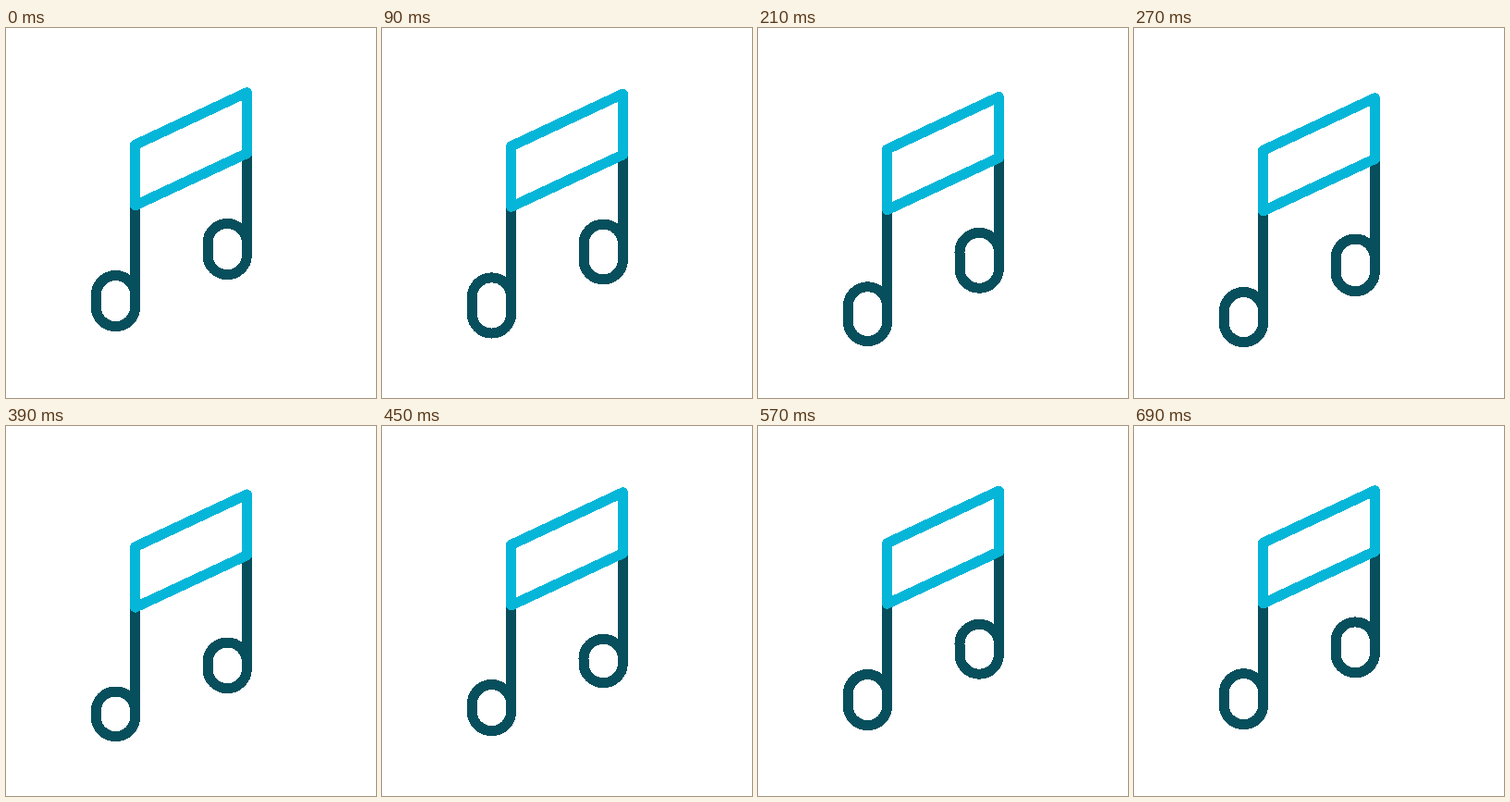
Recreate the animation shown at these times as an HTML page. Size 400x400 px, loop 0.72 s.

```html
<!DOCTYPE html>
<html lang="en">
<head>
<meta charset="utf-8">
<title>Bouncing notes</title>
<style>
  html, body { margin: 0; width: 100%; height: 100%; overflow: hidden; background: #fff; }
  svg { display: block; width: 100%; height: 100%; }
  path { fill: none; stroke-width: 11; stroke-linejoin: round; shape-rendering: crispEdges; }
  .note { stroke: #074f5c; }
  .beam { stroke: #05b6d8; }
</style>
</head>
<body>
<svg viewBox="0 0 400 400">
  <path class="note" id="left"/>
  <path class="note" id="right"/>
  <path class="beam" id="beam" d="M139.7 126.3 L260.4 69.7 V135.5 L139.7 191.8 Z"/>
</svg>
<script>
const LOOP = 720, STEP = 30, RADIUS = 21.2;
const times = [0, 150, 270, 390, 450, 570, 690];

// Downward shift of each part, in pixels, at the times above.
const shift = {
  beam:        [0, 3, 6, 4.3, 2.1, 0.4, 0],
  leftTop:     [0, 6, 18, 19.5, 12, 1, 0.2],
  leftBottom:  [0, 13, 17, 13, 7, 1, 0],
  rightTop:    [0, 3.5, 16.5, 22.5, 18.8, 2.8, 0.4],
  rightBottom: [0, 10, 18, 17, 11, 1.5, 0.1]
};

// Smooth periodic curve through the key values.
function curve(values) {
  const n = times.length;
  const wrap = i => (i + n) % n;
  const span = i => (times[wrap(i + 1)] - times[wrap(i)] + LOOP) % LOOP;
  const slope = i => (values[wrap(i + 1)] - values[wrap(i)]) / span(i);
  const tangent = i =>
    (slope(i - 1) * span(i) + slope(i) * span(i - 1)) / (span(i - 1) + span(i));

  return t => {
    let i = n - 1;
    while (times[i] > t) i--;
    const h = span(i), u = (t - times[i]) / h, v = 1 - u;
    return values[i] * (1 + 2 * u) * v * v + values[wrap(i + 1)] * u * u * (3 - 2 * u)
      + h * u * v * (tangent(i) * v - tangent(i + 1) * u);
  };
}

const at = {};
for (const key in shift) at[key] = curve(shift[key]);

const el = id => document.getElementById(id);
const left = el('left'), right = el('right'), beam = el('beam');

// Stem running down into a rounded, stretchable head.
function note(x, stemTop, top, bottom) {
  const r = RADIUS, arc = `A${r} ${r} 0 0 `;
  const upper = top + r, lower = Math.max(bottom - r, upper);
  return `M${x} ${stemTop} V${lower} ${arc}1 ${x - 2 * r} ${lower}`
    + ` V${upper} ${arc}1 ${x} ${upper}`;
}

function draw(now) {
  const t = Math.floor(now % LOOP / STEP) * STEP;
  const y = at.beam(t);
  beam.setAttribute('transform', `translate(0 ${y})`);
  left.setAttribute('d', note(139.7, 191 + y, 267.5 + at.leftTop(t), 322.7 + at.leftBottom(t)));
  right.setAttribute('d', note(260.4, 135 + y, 211.5 + at.rightTop(t), 266.7 + at.rightBottom(t)));
}

const start = performance.now();
function tick() {
  draw(performance.now() - start);
  requestAnimationFrame(tick);
}
tick();
</script>
</body>
</html>
```
